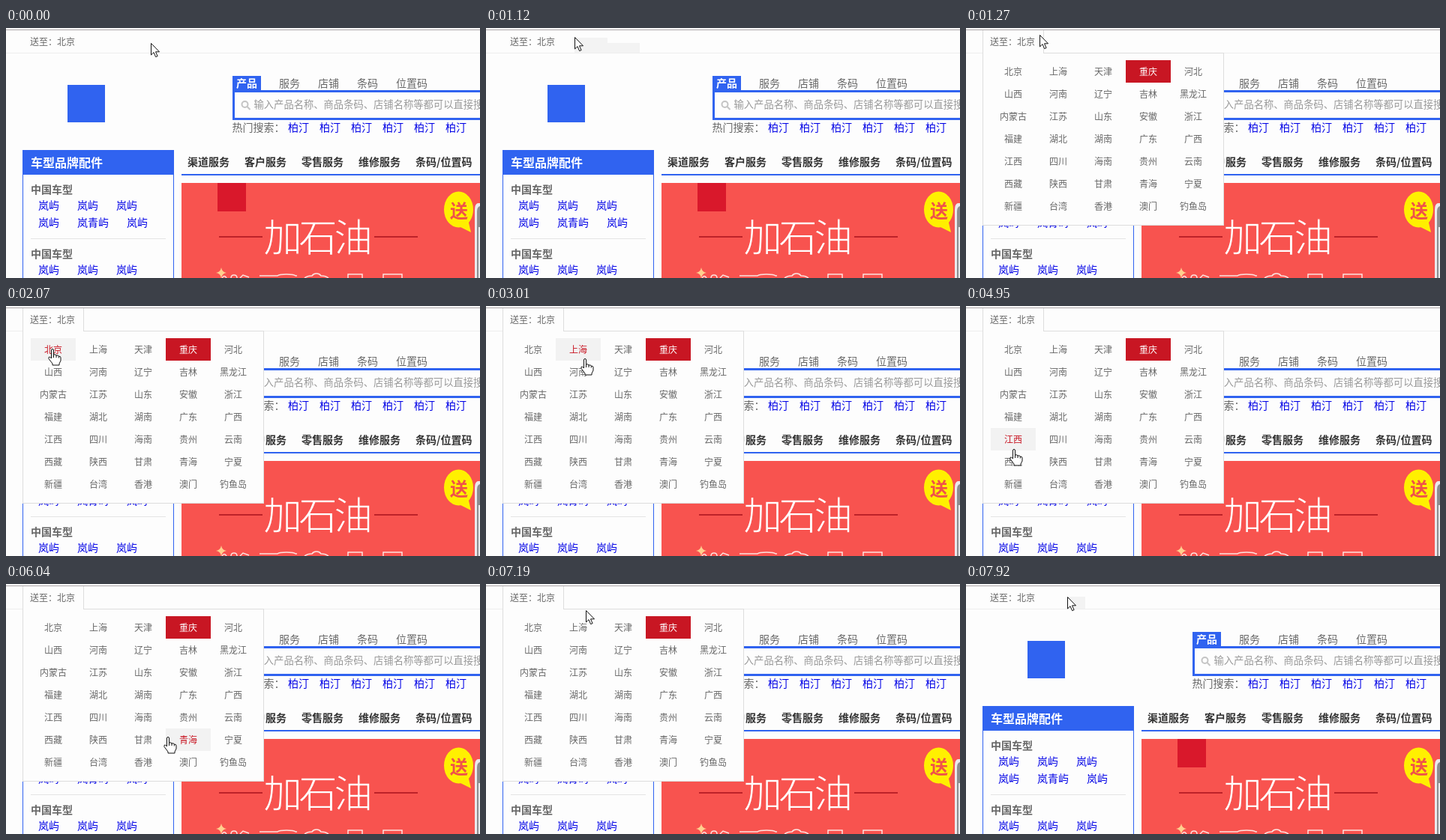
An HTML page for the animation above (8000 ms loop, 632x334 px).

```html
<!DOCTYPE html>
<html lang="zh-CN">
<head>
<meta charset="utf-8">
<title>送至</title>
<style>
  html, body { margin: 0; width: 100%; height: 100%; overflow: hidden; background: #fdfdfd; }
  svg { display: block; width: 632px; height: 334px; font: 14px "Noto Sans CJK SC", "Noto Sans CJK", sans-serif; fill: #666; }
  rect { shape-rendering: crispEdges; }
  .small { font-size: 12px; }
  .bold { font-weight: bold; }
  .mid { font-family: "Noto Sans CJK TC", "Noto Sans CJK", sans-serif; }
  .blue { fill: #3063f0; }
  .link { fill: #0000e6; }
  .dark { fill: #333; }
  .white { fill: #fff; }
  .line { fill: none; stroke: #fde3e0; stroke-width: 1.5; }
  .edge { fill: none; stroke: #ddd; shape-rendering: crispEdges; }
  .pointer { fill: #fff; stroke: #111; stroke-linejoin: round; }
  .headline { font-size: 52px; letter-spacing: -5px; fill: #fff; stroke: #f8534f; stroke-width: 1.3; }
  #cells text { text-anchor: middle; }
  #cells rect { fill: none; }
  #cells .hover rect { fill: #f2f2f2; }
  #cells .hover text { fill: #c81623; }
  #cells .active rect { fill: #c81623; }
  #cells .active text { fill: #fff; }
</style>
</head>
<body>
<svg viewBox="0 0 632 334">
  <rect width="632" height="334" fill="#fdfdfd"/>
  <rect y="2" width="632" height="1" fill="#aaa5a8"/>
  <rect y="33" width="632" height="1" fill="#eee"/>
  <path id="trail" fill="#f3f3f3" shape-rendering="crispEdges"/>
  <text class="small" x="32" y="23">送至<tspan class="mid">：</tspan>北京</text>

  <rect class="blue" x="82" y="76" width="50" height="50"/>

  <rect class="blue" x="302" y="64" width="38" height="20"/>
  <text class="bold white" x="307" y="79">产品</text>
  <g id="tabs"></g>
  <rect class="blue" x="302" y="83" width="330" height="40"/>
  <rect x="305" y="86" width="327" height="34" fill="#fdfdfd"/>
  <g fill="none" stroke="#c4c4c4" stroke-width="2">
    <circle cx="318.500" cy="102" r="4"/>
    <path d="M321.500 105l4 4"/>
  </g>
  <text x="330.500" y="107" font-size="13.300" fill="#999">输入产品名称、商品条码、店铺名称等都可以直接搜索</text>
  <text x="301.500" y="138">热门搜索<tspan class="mid">：</tspan></text>
  <g id="hot" class="link"></g>

  <g id="nav" class="bold dark"></g>
  <rect class="blue" x="234" y="195" width="398" height="2"/>

  <rect class="blue" x="22" y="163" width="202" height="171"/>
  <rect x="23" y="196" width="200" height="138" fill="#fdfdfd"/>
  <text class="bold white" x="33" y="186" font-size="16">车型品牌配件</text>
  <g class="bold">
    <text x="33" y="221">中国车型</text>
    <text x="33" y="307">中国车型</text>
  </g>
  <rect x="33" y="281" width="180" height="1" fill="#e4e4e4"/>
  <g id="brands" class="link"></g>

  <rect x="234" y="207" width="398" height="127" fill="#f8534f"/>
  <rect x="282" y="207" width="38" height="38" fill="#d9182b"/>
  <path d="M284 279h58M491 279h58" stroke="#bd2229" stroke-width="2"/>
  <text class="headline" x="343" y="299">加石油</text>
  <path d="M287 320q1 6 7 7q-6 1-7 7q-1-6-7-7q6-1 7-7z" fill="#ffd08f"/>
  <path class="line" d="M288 334q3-5 6 0M300 334q0-4 4-4t4 4M312 334l4-4 8 3M338 331h24q2-2 12-2t12 2h2M398 334q4-3 10-3q2-3 6-3t6 3q6 0 10 3M456 334v-5h19v5M503 334v-5h25v5"/>
  <path d="M606 266l14 7-4-17z" fill="#fff000"/>
  <ellipse cx="603.500" cy="242.500" rx="19.500" ry="24" fill="#fff000"/>
  <text class="bold" x="592" y="253" font-size="24" fill="#f0504a">送</text>
  <path d="M632 234h-3q-4 1-4 9v91h7z" fill="#e9e9ec"/>
  <path d="M632 238q-4 1-4 7v89h2v-68h2z" fill="#8c8c90"/>

  <g id="popup" class="small">
    <path d="M22 3h82v30h240v231H22z" fill="#fdfdfd"/>
    <path class="edge" d="M22.500 3v260.500h321v-230h-240V3"/>
    <text x="32" y="23">送至<tspan class="mid">：</tspan>北京</text>
    <g id="cells"></g>
  </g>

  <path id="arrow" class="pointer" d="M.5.5v15.500l3.500-3.400 2.600 6 2.500-1-2.600-5.800h5z"/>
  <path id="hand" class="pointer" d="M-1.500 13V2a1.500 1.500 0 0 1 3 0v6q3-.8 3.500 1q3-.8 3.300 1.200q2.700-.4 2.700 1.800v4l-2 4v2H0v-2l-5-6.500q-.6-3 1.500-2.500zM1.500 8v4M5 9v3M8.300 10.200v2.300"/>
</svg>
<script>
const LOOP = 8000, OPEN = 1270, CLOSE = 7500, CELL_W = 60, CELL_H = 30, LEFT = 33, TOP = 43;
const $ = id => document.getElementById(id);

function add(parent, tag, attrs, text = "") {
  const el = document.createElementNS("http://www.w3.org/2000/svg", tag);
  for (const k in attrs) el.setAttribute(k, attrs[k]);
  el.textContent = text;
  return parent.appendChild(el);
}

function row(id, words, x, y, gap) {
  words.split(" ").forEach((word, i) => add($(id), "text", { x: x + i * gap, y }, word));
}

row("tabs", "服务 店铺 条码 位置码", 364, 79, 52);
row("hot", "柏汀 柏汀 柏汀 柏汀 柏汀 柏汀", 376, 138, 42);
row("nav", "渠道服务 客户服务 零售服务 维修服务 条码/位置码", 242, 184, 76);
row("brands", "岚屿 岚屿 岚屿", 43, 242, 52);
row("brands", "岚屿 岚青屿", 43, 265, 52);
row("brands", "岚屿", 161, 265, 0);
row("brands", "岚屿 岚屿 岚屿", 43, 328, 52);

const cities = ("北京 上海 天津 重庆 河北 山西 河南 辽宁 吉林 黑龙江 内蒙古 江苏 山东 安徽 浙江 " +
  "福建 湖北 湖南 广东 广西 江西 四川 海南 贵州 云南 西藏 陕西 甘肃 青海 宁夏 " +
  "新疆 台湾 香港 澳门 钓鱼岛").split(" ");
const cells = cities.map((city, i) => {
  const x = LEFT + i % 5 * CELL_W, y = TOP + Math.floor(i / 5) * CELL_H;
  const g = add($("cells"), "g", {});
  add(g, "rect", { x, y, width: CELL_W, height: CELL_H });
  add(g, "text", { x: x + CELL_W / 2, y: y + 20 }, city);
  g.classList.toggle("active", city === "重庆");
  return g;
});

// Pointer runs: first time, last time, steps, start x, y, end x, y
const runs = [
  [0, 0, 1, 193, 20], [280, 280, 1, 191, 20],
  [550, 970, 4, 183, 20, 150, 20], [1120, 1120, 1, 118, 12],
  [1270, 1390, 2, 98, 9, 80, 8],
  [1800, 2070, 3, 74, 22, 62, 57], [2200, 2730, 5, 72, 61, 126, 62],
  [2880, 3840, 8, 132, 70, 188, 139], [3970, 3970, 1, 191, 168],
  [4110, 4950, 7, 170, 170, 64, 191],
  [5070, 5346, 3, 84, 203, 150, 215], [5484, 5760, 3, 176, 214, 220, 209],
  [6040, 6040, 1, 216, 204], [6190, 7060, 7, 206, 185, 134, 46],
  [7190, 7500, 3, 133, 35, 147, 20], [7920, 7920, 1, 135, 17]
];

function pointerAt(t) {
  const [from, to, n, x0, y0, x1, y1] = runs.filter(r => r[0] <= t).pop();
  if (n === 1) return [x0, y0];
  const k = Math.min(n - 1, Math.floor((t - from) / (to - from) * (n - 1) + 1e-6)) / (n - 1);
  return [Math.round(x0 + (x1 - x0) * k), Math.round(y0 + (y1 - y0) * k)];
}

// Grey patch left in the top bar behind the pointer
function trailAt(t, x) {
  if (t >= 7920) return "M135 17h24v16h-24z";
  if (t < 280 || t >= OPEN) return "";
  return t < 1120 ? `M${x} 20H205V33H${x}z` : "M118 13h44v7h43v13h-87z";
}

function draw(now) {
  const t = now % LOOP, [x, y] = pointerAt(t), open = t >= OPEN && t < CLOSE;
  const col = Math.floor((x - LEFT) / CELL_W), line = Math.floor((y - TOP) / CELL_H);
  const over = open && col >= 0 && col < 5 && line >= 0 && line < 7 ? line * 5 + col : -1;
  cells.forEach((cell, i) => cell.classList.toggle("hover", i === over));
  $("popup").style.display = open ? "" : "none";
  $("trail").setAttribute("d", trailAt(t, x));
  $("arrow").style.display = over < 0 ? "" : "none";
  $("hand").style.display = over < 0 ? "none" : "";
  $(over < 0 ? "arrow" : "hand").setAttribute("transform", `translate(${x} ${y})`);
}

const start = performance.now();
function tick() {
  draw(performance.now() - start);
  requestAnimationFrame(tick);
}
tick();
</script>
</body>
</html>
```
